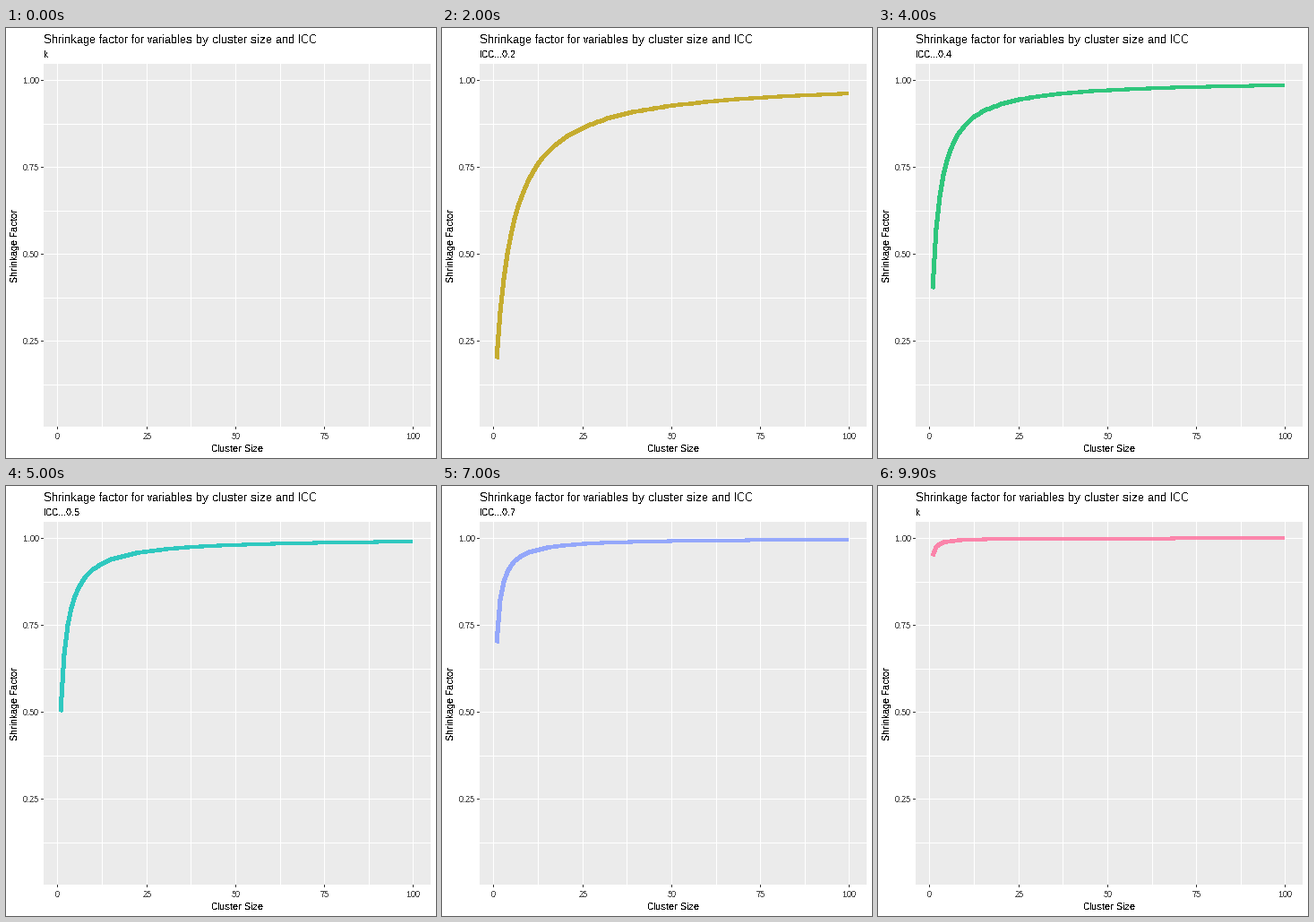
Recreate the animation shown at these times as a matplotlib script. Size 480 by 480 pixels, loop 10 s.

```python
import math

import matplotlib.pyplot as plt
import numpy as np
from matplotlib.animation import FuncAnimation
from matplotlib.patches import Rectangle

SIZE, DPI = 480, 96
PX = 72 / DPI                      # points per pixel
LEFT, RIGHT, TOP, BOTTOM = 42, 474, 40, 445
STEP = 5                           # frames per state
ICCS = [round(0.05 * k, 2) for k in range(1, 20)]
LABELS = ["k"] + [f"ICC...{v:g}" for v in ICCS]

plt.rcParams.update({
    "font.family": "Liberation Sans",
    "text.antialiased": False,
    "text.hinting": "native",
    "text.hinting_factor": 1,
    "text.kerning_factor": 6,
    "path.simplify": False,
})


def hcl(hue, chroma=100, lum=65):
    """Polar LUV colour to sRGB."""
    h = math.radians(hue)
    y = ((lum + 16) / 116) ** 3
    u = chroma * math.cos(h) / (13 * lum) + 0.1978398
    v = chroma * math.sin(h) / (13 * lum) + 0.4683363
    x = 9 * y * u / (4 * v)
    z = -x / 3 - 5 * y + 3 * y / v
    linear = (3.240479 * x - 1.537150 * y - 0.498535 * z,
              -0.969256 * x + 1.875992 * y + 0.041556 * z,
              0.055648 * x - 0.204043 * y + 1.057311 * z)
    return [min(1, max(0, 1.055 * c ** (1 / 2.4) - 0.055 if c > 0.00304 else 12.92 * c))
            for c in linear]


def to_x(n):
    return np.floor(57.4 + 3.97 * np.asarray(n) + 0.5)


def to_y(v):
    return np.floor(58.2 + 388 * (1 - np.asarray(v)) + 0.5)


fig = plt.figure(figsize=(SIZE / DPI, SIZE / DPI), dpi=DPI, facecolor="white")
ax = fig.add_axes([0, 0, 1, 1])
ax.set_xlim(0, SIZE)
ax.set_ylim(SIZE, 0)
ax.axis("off")


def box(x, y, w, h, color):
    ax.add_patch(Rectangle((x, y), w, h, fc=color, lw=0, aa=False))


def text(x, y, s, size, color="black", **kw):
    return ax.text(x, y, s, fontsize=size * PX, color=color, **kw)


box(LEFT, TOP, RIGHT - LEFT, BOTTOM - TOP, "#EBEBEB")
for k in range(9):
    gx = to_x(12.5 * k)
    box(gx, TOP, 1, BOTTOM - TOP, "white")
    if k % 2 == 0:
        box(gx, BOTTOM, 1, 3, "#333333")
        text(gx + 0.5, 459, f"{12.5 * k:.0f}", 9, "#4D4D4D", ha="center")
for k in range(1, 9):
    gy = to_y(k / 8)
    box(LEFT, gy, RIGHT - LEFT, 1, "white")
    if k % 2 == 0:
        box(LEFT - 3, gy, 3, 1, "#333333")
        text(37, gy + 4, f"{k / 8:.2f}", 9, "#4D4D4D", ha="right")

text(42, 17, "Shrinkage factor for variables by cluster size and ICC", 13)
text(258, 473, "Cluster Size", 11, ha="center")
text(15, 243, "Shrinkage Factor", 11, rotation=90, ha="right", va="center",
     rotation_mode="default")
subtitle = text(42, 33, "", 11)
curve, = ax.plot([], [], lw=4 * PX, alpha=0.8, aa=False, snap=False,
                 solid_capstyle="butt", solid_joinstyle="round")

sizes = np.arange(1, 101)


def draw(frame):
    state = frame // STEP
    # the subtitle switches one frame ahead of the curve
    subtitle.set_text(LABELS[(frame + 1) // STEP % len(LABELS)])
    if state == 0:
        curve.set_data([], [])
    else:
        icc = ICCS[state - 1]
        curve.set_data(to_x(sizes), to_y(sizes * icc / (1 + (sizes - 1) * icc)))
        curve.set_color(hcl(15 + 360 * (state - 1) / len(ICCS)))
    return curve, subtitle


anim = FuncAnimation(fig, draw, frames=STEP * len(LABELS), interval=100,
                     repeat=True, repeat_delay=0, blit=False)
plt.show()
```
